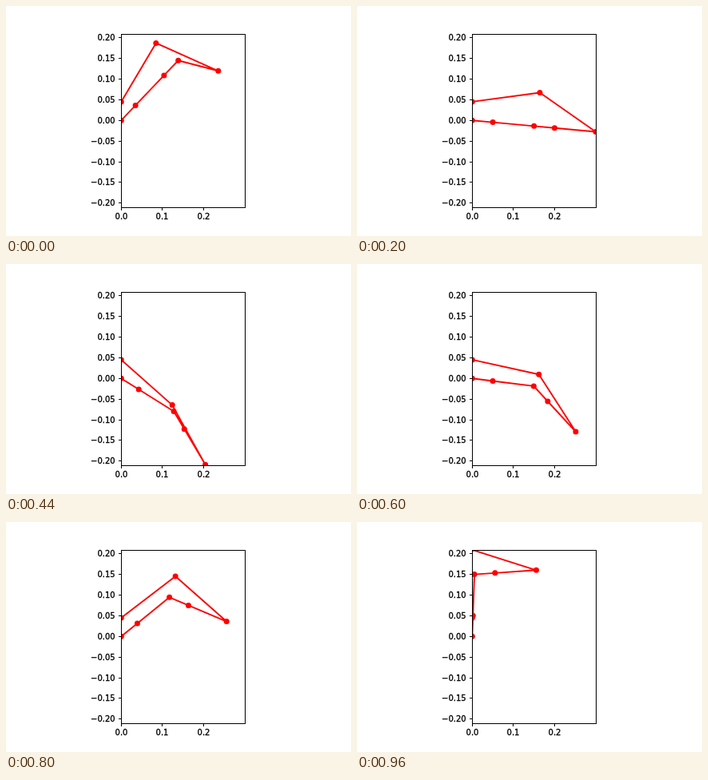
Recreate the animation shown at these times as an HTML page. Size 432 px wide and 288 px high, loop 1 s.

```html
<!DOCTYPE html>
<html lang="en">
<head>
<meta charset="utf-8">
<title>Linkage plot</title>
<style>
  html, body { margin: 0; width: 100%; height: 100%; overflow: hidden; background: #fff; }
  svg { display: block; width: 432px; height: 288px; }
  text { font: 10px "DejaVu Sans", sans-serif; fill: #000; stroke: #000; stroke-width: .3px; }
  .axis { fill: none; stroke: #000; stroke-width: 1; }
  .link { fill: none; stroke: #f00; stroke-width: 1.9; stroke-linejoin: round; }
  .dot { fill: #f00; }
</style>
</head>
<body>
<svg viewBox="0 0 432 288">
  <clipPath id="area"><rect x="144" y="35" width="156" height="217.5"/></clipPath>
  <g id="arm" clip-path="url(#area)"></g>
  <g id="axes"><rect class="axis" x="144.5" y="35.5" width="155" height="217"/></g>
</svg>
<script>
const LOOP = 1000, STEP = 40;
const X0 = 144.3, Y0 = 143.2, SCALE = 517.7;
const BASE = [0, 0.045], ROD = 0.165;

// Joint angles in degrees: [step, angle, slope per step]
const shoulder = [
  [0, 46.4, -10.4], [3, 15.5, -10.2], [7, -24.7, -8.8], [11, -32.1, 4.6],
  [15, -7.2, 7.9], [20, 39, 10.7], [24, 88, 13.5]
];
const elbow = [
  [7, 0, -5], [11, -27.3, -4], [15, -40.2, -3.7], [20, -61.9, -5], [24, -84.1, -5.9]
];
const wrist = [[0, -61, 20.33], [3, 0, 20.33]];

function hermite(keys, s) {
  const last = keys[keys.length - 1];
  if (s <= keys[0][0]) return keys[0][1];
  if (s >= last[0]) return last[1];
  const i = keys.findIndex(k => k[0] > s);
  const [t0, a, m] = keys[i - 1], [t1, b, n] = keys[i];
  const h = t1 - t0, u = (s - t0) / h, v = 1 - u;
  return a * (1 + 2 * u) * v * v + m * h * u * v * v
       + b * u * u * (3 - 2 * u) - n * h * u * u * v;
}

function move([x, y], len, deg) {
  const r = deg * Math.PI / 180;
  return [x + len * Math.cos(r), y + len * Math.sin(r)];
}

// Upper meeting point of two equal rods
function apex(a, b) {
  const dx = b[0] - a[0], dy = b[1] - a[1], d = Math.hypot(dx, dy);
  const h = Math.sqrt(Math.max(0, ROD * ROD - d * d / 4));
  return [(a[0] + b[0]) / 2 - dy / d * h, (a[1] + b[1]) / 2 + dx / d * h];
}

function pose(s) {
  const a = hermite(shoulder, s);
  const b = a + hermite(elbow, s);
  const c = b + hermite(wrist, s);
  const p0 = [0, 0], p1 = move(p0, 0.05, a), p2 = move(p1, 0.1, a);
  const p3 = move(p2, 0.05, b), tip = move(p3, 0.1, c);
  return [p0, p1, p2, p3, tip, apex(BASE, tip), BASE];
}

function add(parent, tag, attrs, text) {
  const el = document.createElementNS("http://www.w3.org/2000/svg", tag);
  for (const k in attrs) el.setAttribute(k, attrs[k]);
  if (text) el.textContent = text;
  return parent.appendChild(el);
}

const axes = document.getElementById("axes");
for (let i = -4; i <= 4; i++) {
  const y = Math.floor(143.28 - i * 0.05 * SCALE) + 0.5;
  add(axes, "path", { class: "axis", d: `M141 ${y}H144` });
  const label = (i < 0 ? "\u2212" : "") + Math.abs(i * 0.05).toFixed(2);
  add(axes, "text", { x: 136.7, y: y + 3.6, "text-anchor": "end" }, label);
}
for (let i = 0; i < 3; i++) {
  const x = Math.floor(144.2 + i * 0.1 * SCALE) + 0.5;
  add(axes, "path", { class: "axis", d: `M${x} 253V256` });
  add(axes, "text", { x, y: 267, "text-anchor": "middle" }, (i / 10).toFixed(1));
}

const arm = document.getElementById("arm");
const link = add(arm, "polyline", { class: "link" });
const dots = Array.from({ length: 7 }, () => add(arm, "circle", { class: "dot", r: 3.5 }));

function draw(now) {
  const s = Math.floor((now % LOOP) / STEP);
  const pts = pose(s).map(([x, y]) => [X0 + x * SCALE, Y0 - y * SCALE]);
  link.setAttribute("points", pts.map(p => p.map(v => v.toFixed(2)).join()).join(" "));
  pts.forEach(([x, y], i) => {
    dots[i].setAttribute("cx", x);
    dots[i].setAttribute("cy", y);
  });
}

const start = performance.now();
function tick() {
  draw(performance.now() - start);
  requestAnimationFrame(tick);
}
tick();
</script>
</body>
</html>
```
